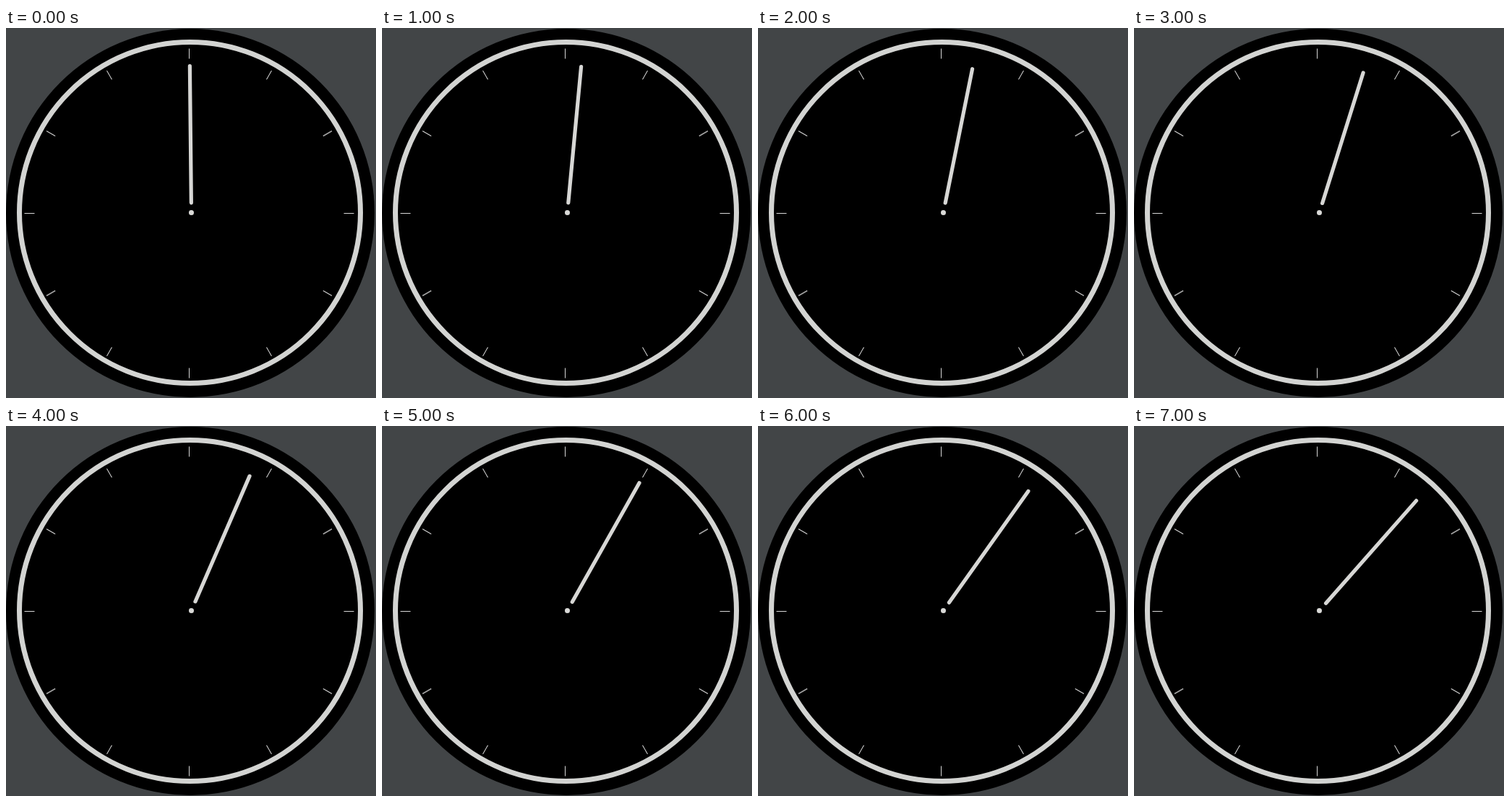
Write an HTML page that moves like this. It is 512 by 512 pixels and loops after 8000 ms.

```html
<!DOCTYPE html>
<html lang="en">
<head>
<meta charset="utf-8">
<title>Clock</title>
<style>
  html, body { margin: 0; width: 100%; height: 100%; overflow: hidden; background: #424547; }
  svg { display: block; width: 100vw; height: 100vh; }
</style>
</head>
<body>
<svg viewBox="0 0 512 512">
  <circle cx="255" cy="256" r="255"/>
  <circle cx="254.5" cy="255.5" r="236" fill="none" stroke="#d3d4d2" stroke-width="7"/>
  <g id="ticks" stroke="#d8d8d8" transform="translate(253.5 256.5)"></g>
  <g transform="translate(256.5 255.5)">
    <line id="hand" y1="-13.7" y2="-202.8" stroke="#d7d7d5" stroke-width="5.2" stroke-linecap="round"/>
    <circle r="3.5" fill="#d9d9d7"/>
  </g>
</svg>
<script>
  const LOOP = 8000, STEP = 1000;
  const DEGREES = 6, OFFSET = -0.6;

  const ticks = document.getElementById('ticks');
  for (let hour = 0; hour < 12; hour++) {
    const tick = document.createElementNS('http://www.w3.org/2000/svg', 'line');
    tick.setAttribute('y1', -214);
    tick.setAttribute('y2', -228);
    tick.setAttribute('transform', `rotate(${hour * 30})`);
    // The ticks at two and eight are softer
    if (hour % 6 === 2) {
      tick.setAttribute('stroke', '#a4a4a4');
      tick.setAttribute('stroke-width', 1.5);
    }
    ticks.append(tick);
  }

  const hand = document.getElementById('hand');
  const start = performance.now();

  // The hand jumps once a second
  function draw() {
    const t = Math.max(0, performance.now() - start) % LOOP;
    const angle = Math.floor(t / STEP) * DEGREES + OFFSET;
    hand.setAttribute('transform', `rotate(${angle})`);
    requestAnimationFrame(draw);
  }
  draw();
</script>
</body>
</html>
```
